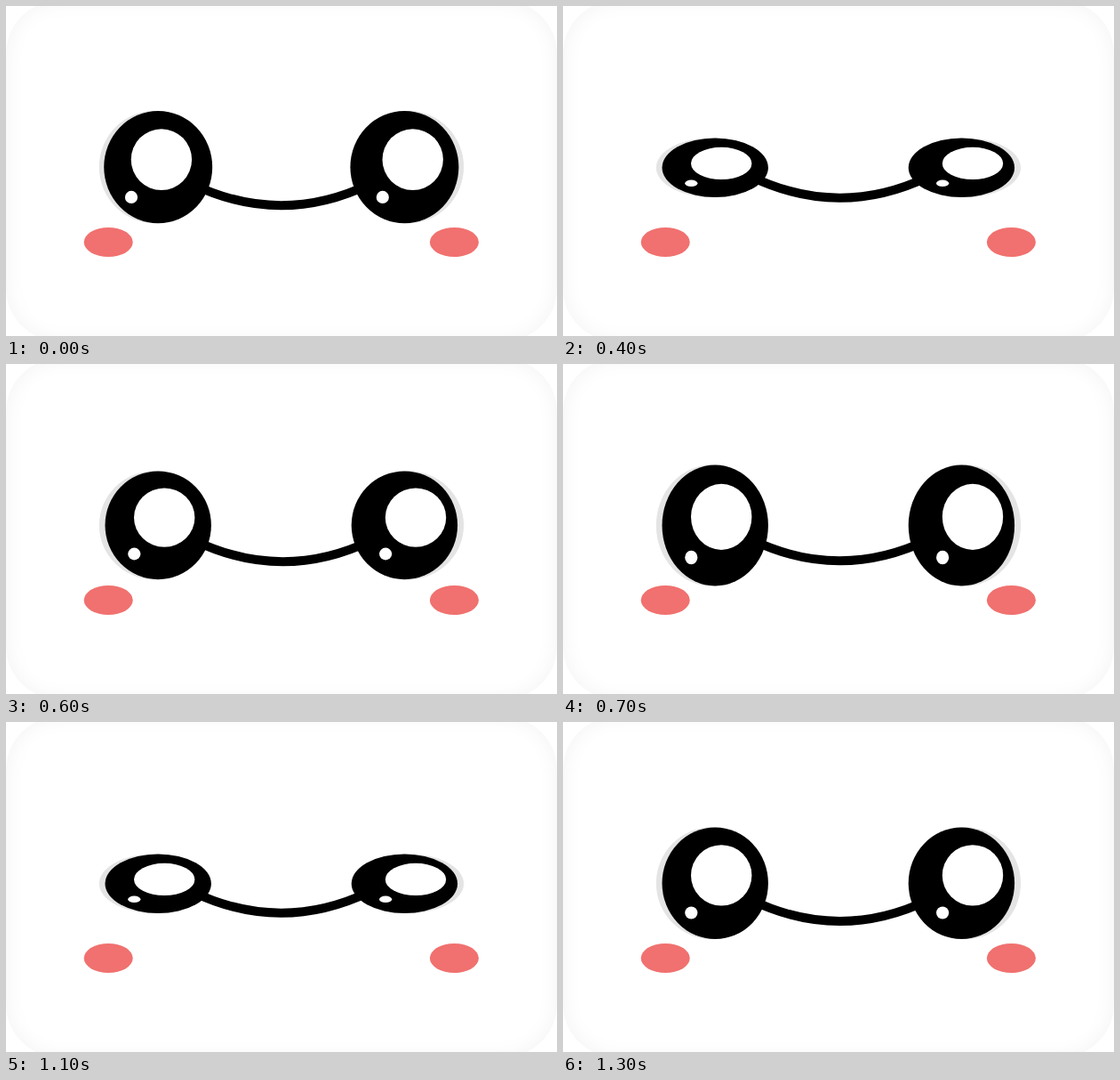
These frames come from a looping animation (620x371 px, 1550 ms). An HTML page:

```html
<!DOCTYPE html>
<html lang="en">
<head>
<meta charset="utf-8">
<title>Blinking face</title>
<style>
html, body { margin: 0; height: 100%; overflow: hidden; background: #fff; }
.stage { position: relative; width: 100%; height: 100%; overflow: clip; }
.card {
  position: absolute; left: 0; top: -6px; width: 620px; height: 383px;
  border-radius: 60px; box-shadow: inset 0 0 25px #0000000d;
}
svg { position: absolute; left: 0; top: 0; }
</style>
</head>
<body>
<div class="stage">
  <div class="card"></div>
  <svg width="620" height="371" viewBox="0 0 620 371">
    <g fill="#f0716f">
      <ellipse cx="115.2" cy="265.5" rx="27.5" ry="16.6"/>
      <ellipse cx="504.4" cy="265.5" rx="27.5" ry="16.6"/>
    </g>
    <path id="mouth" fill="none" stroke="#000" stroke-width="10"/>
    <g id="eyes"></g>
  </svg>
</div>
<script>
const LOOP = 1550;
const rest = { open: 1, rx: 59.7, cy: 181.3, look: 0, drop: 0, mouthX: 311.5, mouthY: 224 };

// Each pose holds until the next one starts.
const poses = [
  { at: 0, open: 1.005, rx: 61, cy: 181.1, look: -3.3, drop: 0.5, mouthX: 309.5, mouthY: 224.2 },
  { at: 200 },
  { at: 400, open: 0.53, cy: 181.7, mouthY: 215.7 },
  { at: 500, open: 0.804, cy: 182, mouthY: 223 },
  { at: 600, open: 0.97, mouthY: 222.2 },
  { at: 700, open: 1.083, cy: 181.5, mouthY: 221.3 },
  { at: 800, open: 1.04, drop: 2.5, mouthY: 221.3 },
  { at: 900, drop: 5, mouthY: 221.5 },
  { at: 1100, open: 0.53, cy: 181.7, mouthX: 309.5, mouthY: 214.7 },
  { at: 1200, open: 0.804, cy: 182, mouthY: 223 },
  { at: 1300 }
].map(p => ({ ...rest, ...p }));

const mouth = document.getElementById("mouth");
const eyes = document.getElementById("eyes");

function oval(cx, cy, rx, ry, fill) {
  return `<ellipse cx="${cx}" cy="${cy}" rx="${rx}" ry="${ry}" fill="${fill}"/>`;
}

function eye(x, backX, shineX, p) {
  const part = (cx, dy, rx, ry, fill) =>
    oval(cx, p.cy + dy * p.open, rx, ry * p.open, fill);
  return part(backX, 0, 62.8, 63, "#e4e4e4") +
    part(x, 0, p.rx, 62.8, "#000") +
    part(shineX + p.look, p.drop - 8.9, 34.2, 34.2, "#fff") +
    part(shineX - 33.9 + p.look, p.drop + 33.2, 7.1, 7.1, "#fff");
}

function draw(now) {
  const t = now % LOOP;
  const p = poses.findLast(q => q.at <= t);
  mouth.setAttribute("d", `M${p.mouthX - 100} ${p.mouthY - 24}q100 48 200 0`);
  eyes.innerHTML = eye(171.2, 167.6, 178.2, p) + eye(448.4, 452.3, 461, p);
}

const start = performance.now();
function tick() {
  draw(performance.now() - start);
  requestAnimationFrame(tick);
}
tick();
</script>
</body>
</html>
```
